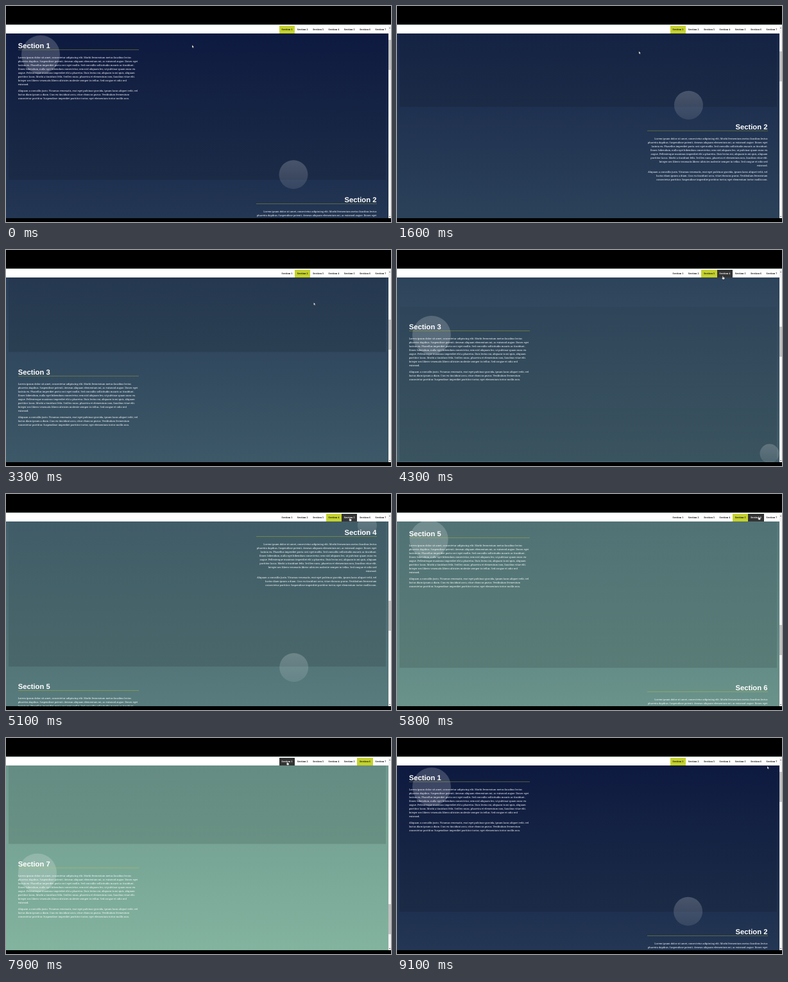
Write an HTML page that moves like this. It is 600 px wide and 338 px high and loops after 9200 ms.

```html
<!DOCTYPE html>
<html lang="en">
<head>
<meta charset="utf-8">
<title>Sections</title>
<style>
html, body { margin: 0; width: 100%; height: 100%; overflow: hidden; background: #000; }
div, i, h2, p { position: absolute; margin: 0; }
#stage { width: 600px; height: 338px; overflow: hidden; background: #000; text-rendering: geometricPrecision; }
#edge { top: 29px; width: 600px; height: 1px; background: #cfe3d8; }
#view { top: 43px; width: 596px; height: 289px; overflow: hidden; }
#page { top: -112px; width: 596px; height: 1839px; background: linear-gradient(rgb(6,16,60), rgb(140,192,166)); }
section { position: absolute; left: 4px; width: 588px; height: 241px; color: #fff; }
section.on { background: linear-gradient(rgba(0,0,0,.04), rgba(0,0,0,.12)); }
section i { border-radius: 50%; background: linear-gradient(rgba(255,255,255,.2), rgba(255,255,255,.1)); }
section i.big { background: rgba(255,255,255,.187); }
.text { left: 14.7px; width: 188px; height: 241px; }
section:nth-child(even) .text { left: 385.5px; text-align: right; }
h2, p { width: 100%; white-space: nowrap; }
h2 { top: 25.7px; height: 11.6px; font: bold 11.25px/12px "Liberation Sans", Arial, sans-serif; border-bottom: 1px solid rgba(204,204,34,.35); }
p { top: 47.8px; font: 3.85px/6.08px "Noto Serif", serif; }
p + p { top: 99.7px; }
#nav { top: 30px; width: 600px; height: 13px; background: #fff; }
#nav div { top: 1px; width: 24.4px; height: 12px; text-align: center; font: bold 3.7px/14px "Noto Serif", serif; color: #111; }
#nav .on { background: #c5d22d; }
#nav .hover { background: #333; color: #fff; }
#bar { left: 596px; top: 31px; width: 4px; height: 301px; background: #f1f1f1; }
#bar i { left: 1.2px; width: 1.6px; height: 1.2px; background: #777; }
#thumb { left: .4px; width: 3.4px; height: 47px; background: #c1c1c1; }
svg { position: absolute; width: 8px; height: 8px; overflow: visible; }
</style>
</head>
<body>
<div id="stage">
  <div id="edge"></div>
  <div id="view"><div id="page"></div></div>
  <div id="nav"></div>
  <div id="bar"><i style="top:3px"></i><i style="top:298px"></i><div id="thumb"></div></div>
  <svg id="cursor"><path fill="#fff" stroke="#222" stroke-width=".35"/></svg>
</div>
<script>
const LOOP = 9200, STEP = 241, SPIN = 1900, FADE = 250;
const $ = id => document.getElementById(id);
const paragraphs = [
  `Lorem ipsum dolor sit amet, consectetur adipiscing elit. Morbi fermentum metus faucibus lectus
pharetra dapibus. Suspendisse potenti. Aenean aliquam elementum mi, ac euismod augue. Donec eget
lacinia ex. Phasellus imperdiet porta orci eget mollis. Sed convallis sollicitudin mauris ac tincidunt.
Donec bibendum, nulla eget bibendum consectetur, sem nisl aliquam leo, ut pulvinar quam nunc eu
augue. Pellentesque maximus imperdiet elit a pharetra. Duis lectus mi, aliquam in mi quis, aliquam
porttitor lacus. Morbi a tincidunt felis. Sed leo nunc, pharetra et elementum non, faucibus vitae elit.
Integer nec libero venenatis libero ultricies molestie semper in tellus. Sed congue et odio sed
euismod.`,
  `Aliquam a convallis justo. Vivamus venenatis, erat eget pulvinar gravida, ipsum lacus aliquet velit, vel
luctus diam ipsum a diam. Cras eu tincidunt arcu, vitae rhoncus purus. Vestibulum fermentum
consectetur porttitor. Suspendisse imperdiet porttitor tortor, eget elementum tortor mollis non.`
].map(p => `<p>${p.replace(/\n/g, '<br>')}</p>`).join('');

const linear = p => p;
const smooth = p => (1 - Math.cos(Math.PI * p)) / 2;
const clamp = p => Math.max(0, Math.min(1, p));

// start, duration, target, easing: wheel scrolling first, then menu clicks
const scrolls = [
  [900, 1300, 212, linear], [2800, 750, 424, linear],
  [4350, 350, 3 * STEP, smooth], [5080, 350, 4 * STEP, smooth],
  [6130, 350, 5 * STEP, smooth], [7067, 350, 6 * STEP, smooth],
  [7822, 395, 0, smooth]
];
// time, x, y of the pointer tip
const moves = [
  [0, 290, 61], [700, 290, 61], [2600, 479.5, 82], [3700, 479.5, 82],
  [4200, 507, 40.5], [4600, 507, 40.5], [4980, 535, 37], [5450, 535, 37],
  [5750, 563, 35], [6600, 563, 35], [6950, 582.5, 35], [7300, 582.5, 35],
  [7750, 437.5, 37], [8250, 437.5, 37], [9000, 575, 43.6], [9100, 577, 44], [LOOP, 577, 44]
];
const ARROW = 'M0 0V4.4L1 3.5 1.7 5 2.4 4.7 1.7 3.3H3Z';
const HAND = 'M.2.4Q.8-.3 1.3.4V2L3.2 2.5Q3.8 2.8 3.6 3.6L3 5.4H.7L-.8 3.4Q-.6 2.7.2 3.2Z';

function scrollAt(t) {
  let y = 0;
  for (const [start, length, target, ease] of scrolls)
    y += (target - y) * ease(clamp((t - start) / length));
  return y;
}

function pointerAt(t) {
  const i = moves.findIndex(m => m[0] > t);
  const [t0, x0, y0] = moves[i - 1], [t1, x1, y1] = moves[i];
  const p = smooth((t - t0) / (t1 - t0));
  return [x0 + (x1 - x0) * p, y0 + (y1 - y0) * p];
}

const activeAt = t => Math.min(6, Math.floor((scrollAt(t) + 100) / STEP));

// moments at which another section becomes active
const changes = [[-3.5 * SPIN, 0]];
for (let t = 0; t < LOOP; t += 10) {
  const n = activeAt(t);
  if (n !== changes[changes.length - 1][1]) changes.push([t, n]);
}

function addDisc(parent, x, y, r, spin, big) {
  const el = document.createElement('i');
  if (big) el.className = 'big';
  el.style.cssText = `left:${x - r - 4}px;top:${y - r}px;width:${2 * r}px;height:${2 * r}px`;
  parent.prepend(el);
  return { el, spin };
}

const sections = [], links = [];
for (let n = 0; n < 7; n++) {
  const el = document.createElement('section');
  el.style.top = 100 + n * STEP + 'px';
  el.innerHTML = `<div class="text"><h2>Section ${n + 1}</h2>${paragraphs}</div>`;
  $('page').append(el);
  const discs = [n % 2 ? addDisc(el, 562, 25, 15, SPIN) : addDisc(el, 48.5, 45, 30, SPIN, true)];
  if (n % 3 === 0) discs.push(addDisc(el, 449, 237.4, 22.5, -1.25 * SPIN));
  if (n % 3 === 2) discs.push(addDisc(el, 577, 226, 15, -1.25 * SPIN));
  sections.push({ el, discs });

  const link = document.createElement('div');
  link.textContent = 'Section ' + (n + 1);
  link.style.left = 596 - 24.33 * (7 - n) + 'px';
  $('nav').append(link);
  links.push(link);
}

function stateOf(n, t) {
  let on = false, since = -1e5;
  for (const [at, which] of changes) {
    if (at > t) break;
    if ((which === n) !== on) { on = !on; since = at; }
  }
  const fade = smooth(clamp((t - since) / FADE));
  return { on, since, opacity: on ? fade : 1 - fade };
}

function draw(t) {
  const y = scrollAt(t), [px, py] = pointerAt(t);
  const overNav = py > 31 && py < 43;
  const hovered = overNav ? Math.floor((px - 425.7) / 24.33) : -1;
  $('page').style.transform = `translateY(${-y}px)`;
  $('thumb').style.top = 22 + y * 0.1577 + 'px';

  sections.forEach(({ el, discs }, n) => {
    const { on, since, opacity } = stateOf(n, t);
    el.className = on ? 'on' : '';
    links[n].className = n === hovered && !on ? 'hover' : on ? 'on' : '';
    for (const { el: disc, spin } of discs) {
      const a = 2 * Math.PI * (t - since) / spin;
      disc.style.opacity = opacity;
      disc.style.transform = on ? `translate(${-5 * Math.cos(a)}px,${-5 * Math.sin(a)}px)` : 'none';
    }
  });

  $('cursor').style.transform = `translate(${px}px,${py}px)`;
  $('cursor').firstChild.setAttribute('d', hovered >= 0 ? HAND : ARROW);
}

function tick() {
  draw(Math.floor(performance.now() % LOOP / 100) * 100);
  requestAnimationFrame(tick);
}
tick();
</script>
</body>
</html>
```
